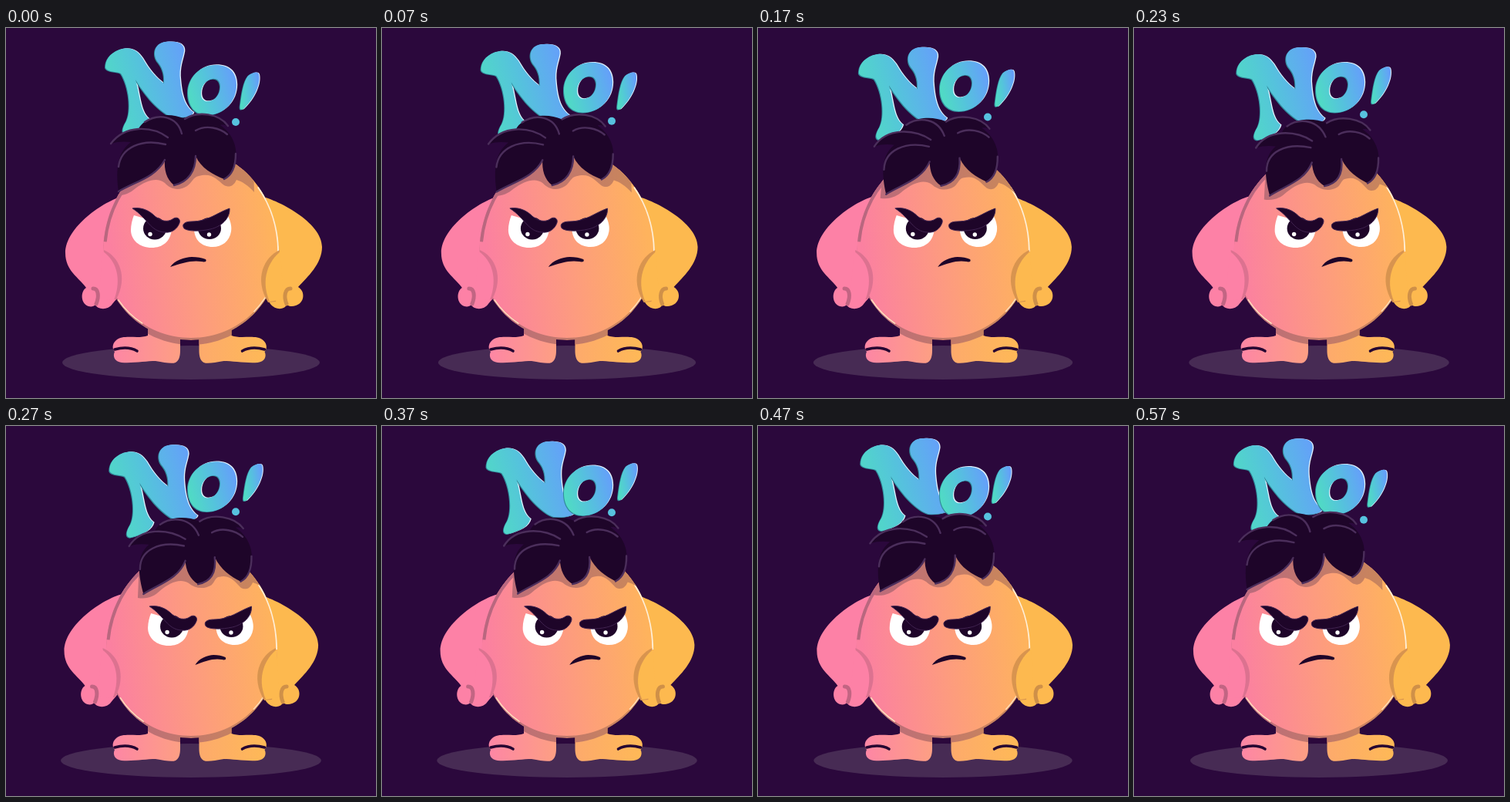
An HTML page that plays this animation: 480 by 480 pixels, repeating every 0.61 s.

```html
<!DOCTYPE html>
<html lang="en">
<head>
<meta charset="utf-8">
<title>No!</title>
<style>
  html, body { margin: 0; width: 100%; height: 100%; overflow: hidden; background: #2b083c; }
  svg { display: block; width: 100vw; height: 100vh; }
  .ink { fill: #1e0529; }
  .line { fill: none; stroke: #4b2e5b; stroke-width: 2.4; stroke-linecap: round; stroke-linejoin: round; }
  .brow { fill: #1e0529; stroke: #402350; stroke-width: 1; }
  .toe { fill: none; stroke: #250632; stroke-width: 3.6; stroke-linecap: round; }
  .knuckle { fill: none; stroke-width: 5; stroke-linecap: round; }
</style>
</head>
<body>
<svg viewBox="0 0 480 480">
  <defs>
    <linearGradient id="skin" gradientUnits="userSpaceOnUse" x1="135" y1="300" x2="345" y2="275">
      <stop offset="0" stop-color="#fb80a1"/><stop offset=".5" stop-color="#fd9b7f"/><stop offset="1" stop-color="#feb35d"/>
    </linearGradient>
    <linearGradient id="dim" gradientUnits="userSpaceOnUse" x1="130" y1="0" x2="350" y2="0">
      <stop offset="0" stop-color="#b9677f"/><stop offset="1" stop-color="#cb8a57"/>
    </linearGradient>
    <linearGradient id="footL"><stop offset="0" stop-color="#fd86a5"/><stop offset="1" stop-color="#fd9f83"/></linearGradient>
    <linearGradient id="footR"><stop offset="0" stop-color="#feb956"/><stop offset="1" stop-color="#fdaa6c"/></linearGradient>
    <linearGradient id="sea" x1="0" y1=".65" x2="1" y2=".35">
      <stop offset="0" stop-color="#50dcc3"/><stop offset=".45" stop-color="#55c3dc"/><stop offset="1" stop-color="#659ffa"/>
    </linearGradient>
    <path id="body" pathLength="100"/>
    <path id="foot" d="M184 385V399C172 404 152 397 143 405C137 410 138 417 141 420C138 426 141 433 150 434C166 435 182 432 194 432C206 434 215 436 220 434C225 431 226 425 226 418V385Z"/>
    <path id="n" d="M129 51C129 42 134 33 147 28C159 24 169 27 177 39C185 53 194 64 205 72C206 58 202 50 196 43C190 33 193 20 206 18C222 16 232 20 231 30C229 42 224 50 226 68C228 90 233 102 243 109C243 114 232 117 217 116C203 112 184 93 168 67C174 88 174 110 186 118C184 128 172 134 156 138C149 137 151 129 156 121C163 108 160 76 149 59C144 56 131 58 129 51Z"/>
    <path id="o" fill-rule="evenodd" d="M236 84C236 64 252 48 272 48C290 48 299 58 299 74C299 96 282 113 261 113C245 113 236 101 236 84ZM253 85C253 92 257 96 263 95C272 94 278 85 278 76C278 69 274 65 268 66C259 67 253 76 253 85Z"/>
    <path id="bar" d="M328 60C331 72 322 92 308 105C304 107 303 105 304 99C306 84 308 70 314 62C320 57 327 56 328 60Z"/>
    <clipPath id="inBody"><use href="#body"/></clipPath>
    <clipPath id="inFeet">
      <use href="#foot"/><use href="#foot" transform="matrix(-1 0 0 1 476.500 0)"/>
    </clipPath>
  </defs>

  <ellipse id="floor" cx="240" cy="434" ry="22" fill="#472b54"/>

  <g fill="url(#sea)">
    <g id="letterN"><use href="#n" x="1.300" fill="#e4f5ff"/><use href="#n" x="-1" y=".8" fill="#318b9c"/><use href="#n"/></g>
    <g id="letterO"><use href="#o" x="1.200" y="-.8" fill="#e4f5ff"/><use href="#o" x="-1" y=".8" fill="#318b9c"/><use href="#o"/></g>
    <g id="mark"><use href="#bar" x="1" fill="#e4f5ff"/><use href="#bar" x="-1" y=".8" fill="#318b9c"/><use href="#bar"/></g>
    <circle id="dot" cx="298" cy="122" r="5" fill="#57c2df"/>
  </g>

  <use href="#foot" fill="url(#footL)"/>
  <path class="toe" d="M141 417C152 414 163 415 170 419"/>
  <g transform="matrix(-1 0 0 1 476.500 0)">
    <use href="#foot" fill="url(#footR)"/>
    <path class="toe" d="M141 417C152 414 163 415 170 419"/>
  </g>
  <g clip-path="url(#inFeet)"><use href="#body" y="6" fill="url(#dim)"/></g>

  <g class="armL" fill="#fd81a6">
    <path d="M152 218C128 224 77 258 77 292C77 315 95 324 104 337C96 342 97 358 107 361C111 362 114 361 116 359C118 365 132 367 138 358C142 353 145 350 148 346L170 290Z"/>
  </g>
  <g class="armR" fill="#fdb94f">
    <path d="M326 217C352 222 410 252 410 284C410 306 391 323 379 336C389 342 387 357 376 360C371 362 367 361 364 359C362 365 350 367 343 358C340 354 338 350 335 345L320 290Z"/>
  </g>

  <g clip-path="url(#inBody)">
    <use href="#body" fill="url(#dim)"/>
    <g transform="translate(0 -3)">
      <use href="#body" fill="url(#skin)"/>
      <use href="#body" fill="none" stroke="#ffe0bd" stroke-width="1.500" stroke-dasharray="0 58 6 21 6 100"/>
    </g>
    <use href="#body" fill="none" stroke="#b9677f" stroke-width="8" stroke-dasharray="0 2 15 100"/>
    <use href="#body" fill="none" stroke="#fff0d6" stroke-width="3.500" stroke-dasharray="0 40 12 100"/>
    <path fill="url(#dim)" data-warp="M138 217C150 219 160 215 168 208C182 198 196 193 206 201C213 209 224 212 235 205C241 201 243 193 250 192C267 187 274 197 283 204C289 207 295 206 299 197C306 199 314 204 322 213L320 140L150 150Z"/>
  </g>

  <g class="armL">
    <path fill="#dc7290" d="M127 288C146 296 159 322 143 352L130 352Z"/>
    <path fill="#fd81a6" d="M126 290C142 301 151 324 140 353L120 352Z"/>
    <path class="knuckle" stroke="#c26583" d="M113 338C120 338 121 348 117 358"/>
  </g>
  <g class="armR">
    <path fill="#d8944f" d="M355 288C335 297 321 325 340 356L350 355Z"/>
    <path fill="#fdb94f" d="M356 290C342 301 329 325 342 355L360 352Z"/>
    <path class="knuckle" stroke="#cf9048" d="M369 338C362 338 360 348 364 358"/>
  </g>

  <g id="eyeL">
    <path fill="#fff" d="M166 243Q185 248 215 260C214 277 203 285 189 285C173 285 162 275 162 262C162 255 164 248 166 243Z"/>
    <ellipse class="ink" cx="193" cy="260" rx="15" ry="14.500"/>
    <circle cx="187" cy="267.500" r="2.700" fill="#fff"/>
    <path class="brow" d="M164 234C176 232 186 237 193 244C201 251 210 252 216 248C221 244 227 247 225 253C222 261 215 266 206 265C187 264 184 247 164 234Z"/>
  </g>
  <g id="eyeR">
    <path fill="#fff" d="M244 260Q270 258 288 244C292 252 293 259 292 264C290 277 280 284 268 284C254 284 244 275 244 260Z"/>
    <ellipse class="ink" cx="264" cy="260" rx="15" ry="14"/>
    <circle cx="263.500" cy="268" r="2.700" fill="#fff"/>
    <path class="brow" d="M290 234C291 247 279 258 265 261C252 264 236 264 231 260C227 254 233 251 241 251C262 251 273 240 290 234Z"/>
  </g>
  <path id="mouth" class="ink" d="M213 310C218 302 232 297 241 297C248 297 254 298 259 300C261 303 258 304 254 303C240 301 229 305 213 310Z"/>

  <path class="ink" data-warp="M136 150C145 138 158 132 172 131C179 116 208 107 232 118C249 107 277 111 288 127C284 126 281 125 278 126C293 136 302 155 297 173C295 184 291 192 283 196C268 190 253 182 246 166C246 186 236 200 218 204C208 196 205 184 206 170C194 194 168 199 146 212C143 190 142 163 162 148C154 147 145 147 136 150Z"/>
  <g class="line">
    <path data-warp="M136 150C145 138 158 132 172 131C190 130 202 136 210 142"/>
    <path data-warp="M146 180C149 155 176 143 207 151"/>
    <path data-warp="M206 171C194 194 168 199 146 212"/>
    <path data-warp="M180 122C198 110 222 114 228 137"/>
    <path data-warp="M246 166C246 186 236 200 218 204"/>
    <path data-warp="M232 118C249 107 277 111 288 127"/>
    <path data-warp="M246 133C260 125 278 130 287 138"/>
    <path data-warp="M298 163C298 182 291 192 283 196"/>
  </g>
</svg>
<script>
const LOOP = 610, STEPS = 18;
const get = id => document.getElementById(id);
const warped = [...document.querySelectorAll('[data-warp]')];
const clamp = v => Math.min(1, Math.max(0, v));
const mix = (a, b, p) => a + (b - a) * p;

const ease = x => x < .5 ? (2 * x) ** 2.2 / 2 : 1 - (2 - 2 * x) ** 2.2 / 2;

function move(target, x, y = 0) {
  document.querySelectorAll(target).forEach(el => el.setAttribute('transform', `translate(${x} ${y})`));
}

// The hair leans sideways; left and middle tips swing further than the roots.
function lean(x, y, p) {
  const swing = .14 - .12 * clamp((x - 235) / 50);
  const hold = 5 * Math.exp(-(((x - 225) / 30) ** 2)) * (y - 115) / 88;
  return `${x + p * (20 + (y - 120) * swing)} ${y + p * (6 - hold)}`;
}

function bodyPath(p) {
  const l = mix(126, 130, p), r = mix(354, 352, p), top = mix(240, 246, p), y = 292;
  return `M${l} ${y}C${l} 218 ${top - 63} 158 ${top} 158C${top + 63} 158 ${r} 218 ${r} ${y}` +
    `C${r} 355 303 405 240 405C177 405 ${l} 355 ${l} ${y}Z`;
}

function draw(time) {
  const tick = Math.floor(time % LOOP / 10) * 10 + 5;
  const n = Math.min(STEPS - 1, Math.floor(tick * 3 / 100));
  const p = ease(1 - Math.abs(n / 9 - 1));
  const cos = k => Math.cos(k * 2 * Math.PI / STEPS);
  const wave = (amp, peak) => amp * (cos(n - peak) - cos(peak));

  get('body').setAttribute('d', bodyPath(p));
  get('floor').setAttribute('rx', mix(167, 169, p));
  for (const el of warped) {
    el.setAttribute('d', el.dataset.warp.replace(/([\d.]+) ([\d.]+)/g, (_, x, y) => lean(+x, +y, p)));
  }

  move('.armL', -1.5 * p);
  move('.armR', -5 * p);
  move('#eyeL', 22.5 * p);
  move('#eyeR', 29 * p);
  get('mouth').setAttribute('transform', `translate(${mix(213, 246, p)} 0) scale(${mix(1, .85, p)} 1) translate(-213 0)`);

  move('#letterN', wave(3.5, 10.5), wave(5, 6.2));
  move('#letterO', 0, wave(5, 13.5));
  move('#mark', wave(2.5, 7), wave(5, 1));
  move('#dot', 0, wave(5.5, 0));
}

function frame() {
  draw(performance.now());
  requestAnimationFrame(frame);
}
frame();
</script>
</body>
</html>
```
